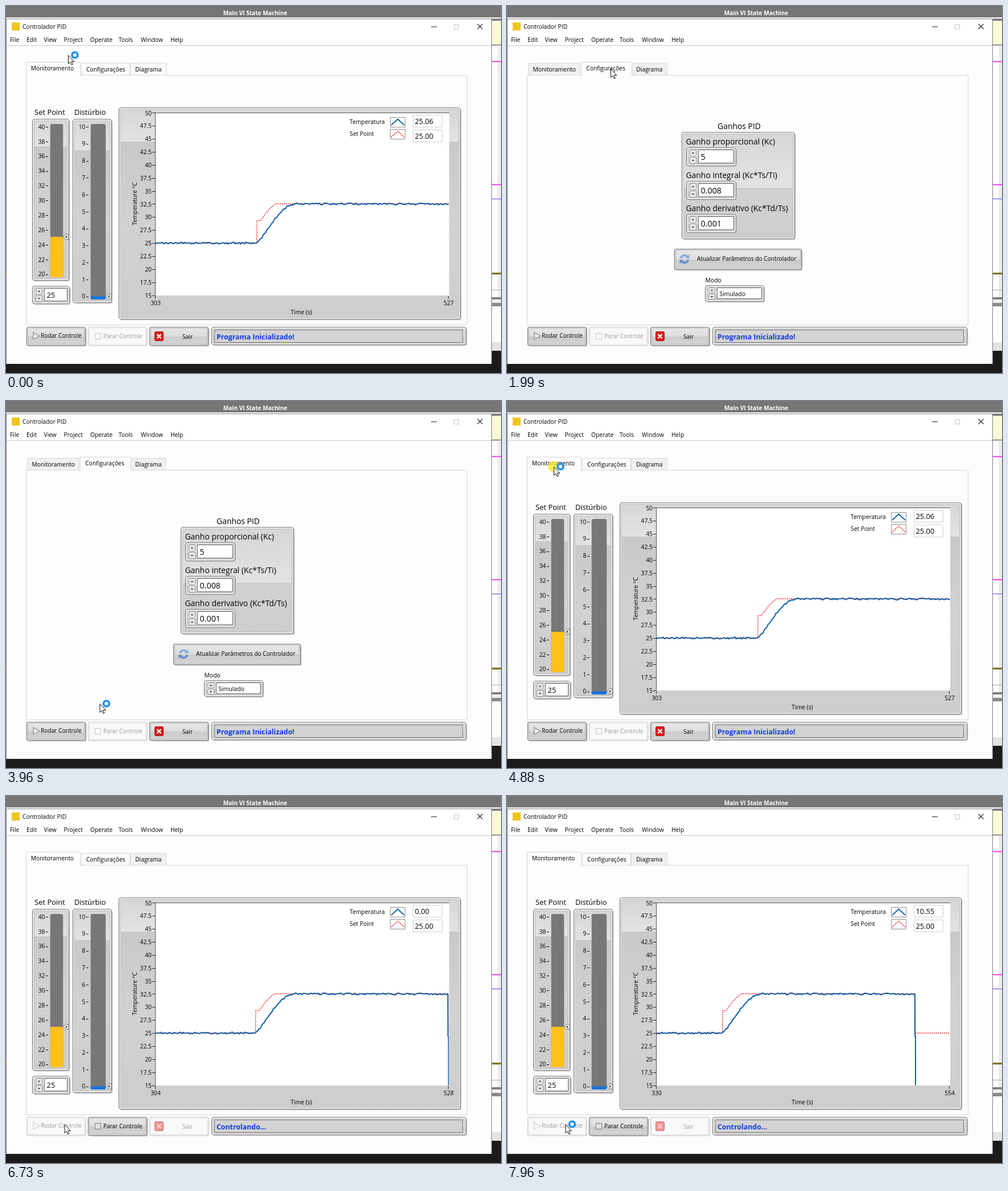
Recreate the animation shown at these times as an HTML page with a canvas. Size 870 by 644 pixels, loop 8000 ms.

```html
<!DOCTYPE html>
<html lang="pt">
<head>
<meta charset="utf-8">
<title>Controlador PID</title>
<style>
html, body { margin: 0; width: 100%; height: 100%; overflow: hidden; background: #fff; }
canvas { display: block; width: 870px; height: 644px; }
</style>
</head>
<body>
<canvas id="stage" width="870" height="644"></canvas>
<script>
const c = document.getElementById('stage').getContext('2d');
const LOOP = 8000, FONT = '"Open Sans", "Noto Sans", sans-serif';
const BLUE = '#0f5ea8', RED = '#f01818';

// ---------- helpers ----------
function rect(x, y, w, h, fill) { c.fillStyle = fill; c.fillRect(x, y, w, h); }

function box(x, y, w, h, fill, stroke, r = 0, lw = 1) {
  c.beginPath();
  c.roundRect(x + .5, y + .5, w - 1, h - 1, r);
  if (fill) { c.fillStyle = fill; c.fill(); }
  if (stroke) { c.strokeStyle = stroke; c.lineWidth = lw; c.stroke(); }
}

function path(points, color, width, fill) {
  c.beginPath();
  points.forEach(([x, y], i) => i ? c.lineTo(x, y) : c.moveTo(x, y));
  if (fill) { c.closePath(); c.fillStyle = fill; c.fill(); }
  if (color) { c.strokeStyle = color; c.lineWidth = width; c.stroke(); }
}

function dashed(points, width) {
  c.setLineDash([2, 1.6]);
  path(points, RED, width);
  c.setLineDash([]);
}

function disc(x, y, r, fill, stroke, lw) {
  c.beginPath();
  c.arc(x, y, r, 0, 7);
  c.fillStyle = fill;
  c.fill();
  if (stroke) { c.strokeStyle = stroke; c.lineWidth = lw; c.stroke(); }
}

function cross(x, y, r, color, width) {
  path([[x - r, y - r], [x + r, y + r]], color, width);
  path([[x + r, y - r], [x - r, y + r]], color, width);
}

function text(s, x, mid, size = 10.3, color = '#000', align = 'left', weight = 400) {
  c.font = `${weight} ${size}px ${FONT}`;
  c.textAlign = align;
  c.fillStyle = color;
  c.fillText(s, x, mid + size * .36);
}

function blend(y0, y1, ...stops) {
  const g = c.createLinearGradient(0, y0, 0, y1);
  stops.forEach(([p, col]) => g.addColorStop(p, col));
  return g;
}

const clamp = u => Math.min(1, Math.max(0, u));
const ease = u => u * u * (3 - 2 * u);
const noise = i => { const h = Math.sin(i * 127.1) * 43758.5453; return h - Math.floor(h) - .5; };

// Raised metallic frame with a gloss step
function metal(x, y, w, h, step = .17) {
  box(x + 2, y + 2, w, h, '#cacaca', null, 4);
  box(x, y, w, h, '#ececec', '#808080', 4, 1.2);
  const fill = blend(y, y + h, [0, '#d6d6d6'], [step, '#e3e3e3'], [step + .001, '#c9c9c9'],
    [.55, '#d2d2d2'], [1, '#cdcdcd']);
  box(x + 3, y + 3, w - 6, h - 6, fill, '#bdbdbd', 2);
}

function button(x, w, state, y = 563, h = 33) {
  const off = state === 'off', hot = state === 'hot';
  box(x + 2, y + 2, w, h, off ? '#ededed' : '#c8c8c8', null, 3);
  box(x, y, w, h, off ? '#fbfbfb' : '#ededed', off ? '#c9c9c9' : '#777', 3, 1.2);
  const tones = off ? ['#f9f9f9', '#f9f9f9', '#f9f9f9', '#f9f9f9']
    : hot ? ['#f7e3b4', '#f2cf86', '#e7b95c', '#f0cd86']
    : ['#e8e8e8', '#dedede', '#cbcbcb', '#d6d6d6'];
  const fill = blend(y, y + h, ...tones.map((tone, i) => [[0, .5, .51, 1][i], tone]));
  box(x + 2, y + 2, w - 4, h - 4, fill, off ? '#e9e9e9' : hot ? '#d9a94c' : '#b9b9b9', 2);
}

function spinner(x, y, h) {
  [-1, 1].forEach(d => {
    const top = y + (d > 0 ? h / 2 : 0), m = top + h / 4 - .5;
    box(x, top, 12, h / 2 - 1, '#e9e9e9', '#999', 2);
    path([[x + 3.5, m - d], [x + 8.5, m - d], [x + 6, m + 1.8 * d]], null, 0, '#444');
  });
}

function numeric(x, y, w, h, value, size) {
  metal(x, y, w, h, .5);
  spinner(x + 6, y + 4, h - 7);
  box(x + 21, y + 4, w - 25, h - 9, '#fff', '#6f6f6f');
  text(value, x + 25.5, y + h / 2 + .5, size);
}

// ---------- surroundings ----------
function hatch(y) {
  for (let x = 854; x < 870; x++)
    for (let j = 0; j < 4; j++) rect(x, y + j, 1, 1, (x + j) % 2 ? '#111' : '#eee');
}

function backdrop() {
  rect(0, 0, 870, 644, '#fff');
  rect(0, 0, 870, 20, '#767676');
  text('Main VI State Machine', 438, 12.5, 10.1, '#fff', 'center', 700);
  hatch(22);
  rect(854, 27, 16, 41, '#fafad6');
  rect(854, 68, 16, 1, '#333');
  rect(864, 70, 6, 442, '#ededed');
  rect(854, 338, 16, 1, '#4a4af0');
  rect(854, 468, 16, 3, '#5c5400');
  for (let x = 854; x < 870; x += 2) {
    [97, 313].forEach(y => { rect(x, y - 1, 1, 2, '#f03ce8'); rect(x + 1, y, 1, 2, '#f03ce8'); });
    rect(x, 469, 1, 1, '#f6e400');
    rect(x, 498, 1, 1, '#555');
  }
  hatch(511);
  rect(854, 516, 16, 5, '#f0f0f0');
  rect(854, 521, 16, 6, '#8a8a8a');
  rect(854, 590, 16, 15, '#e4e4e4');
  rect(0, 628, 870, 16, '#1b1b1b');
  rect(854, 605, 16, 39, '#1b1b1b');
}

function windowFrame() {
  rect(0, 22, 854, 606, '#7d7d7d');
  rect(1, 23, 852, 605, '#fdfdfd');
  rect(1, 23, 852, 46, '#fff');
  rect(1, 69, 852, 1, '#c8c8c8');
  rect(0, 96, 1, 2, '#f03ce8');
  rect(0, 468, 1, 3, '#b5a800');
  rect(10, 29, 14, 14, '#f2c41c');
  text('Controlador PID', 29, 36.5);
  [['File', 7], ['Edit', 36], ['View', 66.5], ['Project', 101.5], ['Operate', 148],
   ['Tools', 198], ['Window', 237], ['Help', 289]].forEach(([s, x]) => text(s, x, 59.5));
  rect(747, 36, 10, 1, '#222');
  box(787, 32, 9, 9, null, '#c4c4c4');
  cross(833, 36, 4.5, '#222', 1.1);
}

const TABS = [['Monitoramento', 37, 92], ['Configurações', 132, 86], ['Diagrama', 218, 64]];

function tabs(active, shades) {
  box(35, 121, 776, 439, '#fdfdfd', '#d6d6d6');
  TABS.forEach(([s, x, w], i) => {
    if (i === active) return;
    box(x, 100, w, 22, shades[i], '#d9d9d9');
    text(s, x + w / 2 + .3, 111, 10.3, '#000', 'center');
  });
  const [s, x, w] = TABS[active];
  box(x - 2, 98, w + 4, 25, '#fdfdfd', '#d6d6d6');
  rect(x - 1, 121, w + 2, 3, '#fdfdfd');
  text(s, x + w / 2 - 1.5, 109, 10.3, '#000', 'center');
}

// ---------- monitoring page ----------
function slider(x, w, h, min, by, level, color) {
  const tx = x + 31.5, tw = w - 42, bottom = 192 + h;
  metal(x, 198, w, h);
  c.save();
  c.beginPath();
  c.roundRect(tx, 207, tw, bottom - 207, 4);
  c.clip();
  rect(tx, 207, tw, bottom - 207, '#777');
  rect(tx, level, tw, bottom - level, color);
  c.restore();
  for (let i = 0; i <= 10; i++) {
    const y = bottom - 5.3 + i * (217.3 - bottom) / 10;
    text(min + i * by, tx - 9, y, 10.3, '#000', 'right');
    rect(Math.round(tx - 8), Math.round(y), 4, 1, '#000');
  }
  const p = x + w - 10, y = level;
  path([[p, y], [p + 4, y - 4.5], [p + 9, y - 4.5], [p + 9, y + 4.5], [p + 4, y + 4.5], [p, y]], '#777', 1, '#f4f4f4');
  path([[p + 3, y], [p + 6, y - 2.5], [p + 6, y + 2.5]], null, 0, '#333');
}

// Process response and its stepped reference, by time in seconds
function temperature(s) {
  return 25 + 7.52 * Math.sin(clamp((s - 380.8) / 30) * Math.PI / 2) ** 1.1 + noise(s) * .36;
}

function reference(s) {
  if (s < 380.5 || s > 527.5) return 25;
  const u = clamp((s - 383) / 11.7);
  return 29.3 + 3.25 * u + .3 * Math.sin(Math.PI * u);
}

function curves(k) {
  const end = 527 + k;
  const point = (s, v) => [263 + (s - 303 - k) * 2.3, 507.5 - (v - 15) * 9.143];
  const goal = [], temp = [];
  for (let s = 303; s <= end; s += .25) goal.push(point(s, reference(s)));
  for (let s = 303; s <= 527; s++) temp.push(point(s, temperature(s)));
  if (k) temp.push(point(527.3, 32.5), point(527.4, 24.4), point(527.8, 24.4), point(527.9, 4));
  c.save();
  c.beginPath();
  c.rect(263, 188, 515.5, 319.5);
  c.clip();
  c.lineJoin = 'round';
  dashed(goal, 1.4);
  path(temp, BLUE, 2);
  c.restore();
}

function chart(k) {
  metal(198, 178, 601, 372, .16);
  rect(262, 187, 517, 321, '#555');
  rect(263, 188, 516, 320, '#fff');
  for (let v = 15; v <= 50; v += 2.5) {
    const y = 507.5 - (v - 15) * 9.143;
    text(v, 256, y + .3, 10.3, '#000', 'right');
    rect(257, Math.round(y), 5, 1, '#222');
  }
  [[263, 303], [778, 527]].forEach(([x, s]) => {
    rect(x - 1, 509, 1, 5, '#222');
    text(s + k, x, 521, 10.3, '#000', 'center');
  });
  text('Time (s)', 519, 537, 10.3, '#000', 'center');
  c.save();
  c.translate(226, 347);
  c.rotate(-Math.PI / 2);
  text('Temperature °C', 0, 0, 10.3, '#000', 'center');
  c.restore();
  curves(k);

  const n = k - 1, value = k < 1 ? 25.06 : .39314 * n + .000486 * n * n;
  ['Temperatura', 'Set Point'].forEach((s, i) => {
    const y = 195 + i * 21, peak = [[677, y + 14], [688.5, y + 3.5], [700, y + 14]];
    text(s, 604, y + 8.5);
    box(675, y, 27, 18, '#fff', '#8c8c8c');
    if (i) dashed(peak, 1.5); else path(peak, BLUE, 1.8);
    box(715, 191 + i * 26, 52, 22, '#fff', '#cfcfcf');
    text((i ? 25 : value).toFixed(2), 718.5, 202.5 + i * 26, 12.8);
  });
}

function monitor(k) {
  text('Set Point', 50, 186.5, 13);
  text('Distúrbio', 120, 186.5, 12.9);
  slider(46, 65, 284, 20, 2, 405, '#ffc01c');
  slider(117, 69, 323, 0, 1, 509.5, '#1475e0');
  numeric(46, 491, 66, 32, '25', 13);
  chart(k);
}

// ---------- settings page ----------
function refreshIcon(x, y) {
  ['#86aede', '#5f8fcb'].forEach((tone, i) => {
    c.save();
    c.translate(x, y);
    c.rotate(i * Math.PI);
    c.beginPath();
    c.arc(0, 0, 6.5, Math.PI * 1.06, Math.PI * 1.75);
    c.lineWidth = 3.6;
    c.strokeStyle = tone;
    c.stroke();
    path([[8.5, -8.5], [8.5, -1.5], [1.5, -1.5]], null, 0, tone);
    c.restore();
  });
}

function settings() {
  text('Ganhos PID', 408, 210.5, 13.9, '#000', 'center');
  metal(307, 221, 199, 188, .52);
  const gains = { 'Ganho proporcional (Kc)': '5', 'Ganho integral (Kc*Ts/Ti)': '0.008', 'Ganho derivativo (Kc*Td/Ts)': '0.001' };
  Object.entries(gains).forEach(([s, v], i) => {
    const y = Math.round(248 + i * 58.5);
    text(s, 314.5, y - 10.5, 13.9);
    numeric(315, y, 88, 33, v, 14.3);
  });
  button(294, 224, 'on', 426, 37);
  refreshIcon(312, 444);
  text('Atualizar Parâmetros do Controlador', 334, 443.5, 10.2);
  text('Modo', 348.5, 481, 10.4);
  numeric(348, 490, 104, 29, 'Simulado', 10.4);
}

// ---------- bottom bar ----------
function bottomBar(t, hot) {
  const run = t >= 6190, ink = on => on ? '#000' : '#9a9a9a';
  button(36, 104, run ? 'off' : hot ? 'hot' : 'on');
  path([[48, 573], [59, 579], [48, 585], [48, 572.5]], run ? '#c2c2c2' : '#777', 1, run ? '#fafafa' : '#e9e9e9');
  text('Rodar Controle', 61, 578.5, 10.2, ink(!run));
  button(144, 104, run ? 'on' : 'off');
  box(156, 574, 11, 11, run ? '#e2e2e2' : '#fbfbfb', run ? '#777' : '#c4c4c4');
  text('Parar Controle', 171, 579.3, 10.1, ink(run));
  button(252, 104, run ? 'off' : 'on');
  c.globalAlpha = run ? .45 : 1;
  box(261, 571, 16, 17, '#e01c1c', '#a80c0c', 2);
  cross(269, 579.5, 3.5, '#fff', 2.4);
  c.globalAlpha = 1;
  text('Sair', 319, 580, 10.3, ink(!run), 'center');
  metal(361, 563, 448, 32, .5);
  box(366, 568, 437, 23, '#d3d3d3', '#7c7c7c');
  const status = t < 6190 ? 'Programa Inicializado!' : t < 6650 ? 'Iniciando Controlador...' : 'Controlando...';
  text(status, 370, 580.3, 12.35, '#0d3cdc', 'left', 700);
}

// ---------- pointer ----------
// Each leg: start, end, and where the pointer arrives
const LEGS = [[60, 70, 122, 87], [130, 140, 131, 87], [340, 780, 212, 198], [780, 1140, 200, 121],
  [1200, 1530, 182, 110], [2200, 2950, 390, 503], [3080, 3500, 376, 503], [3680, 3960, 164.5, 531],
  [3960, 4270, 79, 1], [4450, 4650, 82, 115], [5000, 5640, 102, 550], [5640, 5800, 102.5, 576]];
const BUSY = [[0, 70], [3800, 4120], [4650, 5100], [6420, 6650], [7750, 8000]];
const CLICKS = [[1700, 1880], [4800, 5000], [5940, 6110]];
const during = (spans, t) => spans.some(([a, b]) => t >= a && t < b);

function place(t) {
  let x = 109, y = 86;
  for (const [from, to, nx, ny] of LEGS) {
    const u = ease(clamp((t - from) / (to - from)));
    x += (nx - x) * u;
    y += (ny - y) * u;
  }
  return [x, y];
}

function pointer(t, x, y) {
  if (during(CLICKS, t)) disc(x - .5, y, 10, 'rgba(250, 236, 40, .72)');
  if (during(BUSY, t)) disc(x + 12, y, 5, '#e4f2fd', '#1f8fe8', 3.6);
  const shape = [[0, 0], [0, 15], [3.4, 11.8], [5.8, 17], [8, 16], [5.7, 11], [10.3, 11], [0, 0]];
  path(shape.map(([a, b]) => [x + .5 + a, y + .5 + b]), '#111', 1, '#fff');
}

// ---------- scene ----------
function draw(t) {
  const [x, y] = place(t);
  const second = t >= 1840 && t < 4860;
  backdrop();
  windowFrame();
  tabs(second ? 1 : 0, [t >= 4600 ? '#fafafa' : '#f0f0f0', '#fbfbfb', t >= 1230 ? '#f0f0f0' : '#fafafa']);
  if (second) settings(); else monitor(Math.max(0, Math.floor((t - 6650) / 48.4)));
  bottomBar(t, t > 5650 && y > 562);
  pointer(t, x, y);
}

const start = performance.now();
function loop() {
  draw((performance.now() - start) % LOOP);
  requestAnimationFrame(loop);
}
loop();
</script>
</body>
</html>
```
